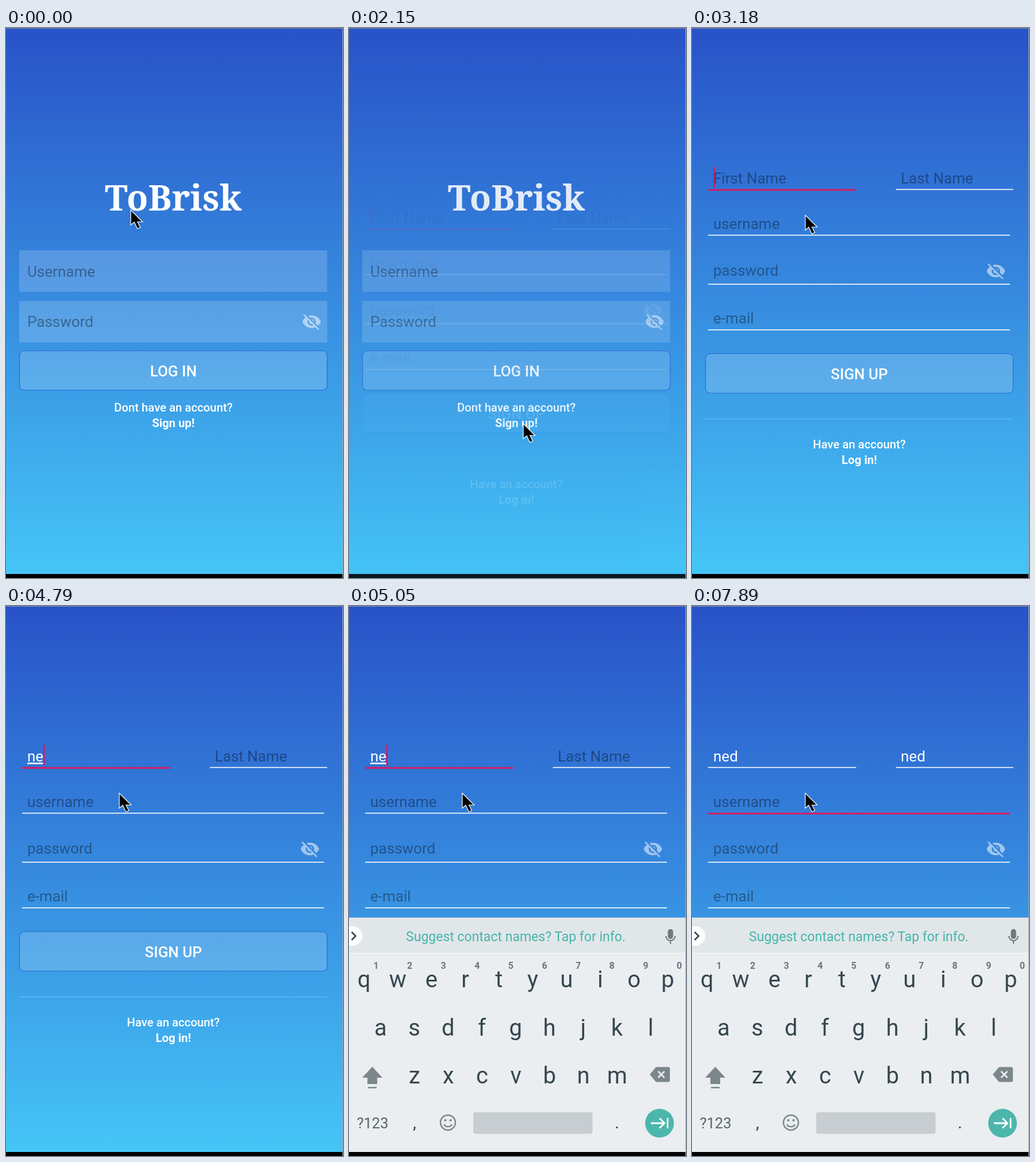
An HTML page for the animation above (8 s loop, 586 by 955 pixels).

```html
<!DOCTYPE html>
<html lang="en">
<head>
<meta charset="utf-8">
<title>Sign up flow</title>
<style>
  html, body { margin: 0; width: 100%; height: 100%; overflow: hidden; background: #000; }
  svg { display: block; width: 586px; height: 955px; font-family: Roboto, sans-serif; }
  .hint { fill: #000; fill-opacity: .37; }
  .mid { text-anchor: middle; }
</style>
</head>
<body>
<svg id="stage" viewBox="0 0 586 955"></svg>
<script>
const PINK = '#d81b60', KEY = '#37474f', ICON = '#7b878b';
const LOOP = 8000;

const rect = (x, y, w, h, attrs = '') =>
  `<rect x="${x}" y="${y}" width="${w}" height="${h}" ${attrs}/>`;
const text = (x, y, size, str, attrs = '') =>
  `<text x="${x}" y="${y}" font-size="${size}" ${attrs}>${str}</text>`;
const label = (y, size, weight, str) =>
  text(291, y, size, str, `class="mid" fill="#fff" font-weight="${weight}"`);
const hint = (x, y, str, id = '') => text(x, y, 26, str, `class="hint" id="${id}"`);
const box = y => rect(23, y, 535.5, 72, 'fill="#fff" fill-opacity=".17"');
const button = (y, str) =>
  rect(23.5, y + .5, 535, 68.5, 'rx="8" fill="#fff" fill-opacity=".17" stroke="none"') +
  rect(23.5, y + .5, 535, 68.5, 'rx="8" fill="none" stroke="#2a6bd2" stroke-width="1.2"') +
  label(y + 45, 26, 500, str);
const line = (x, y, w, id = '') => rect(x, y, w, 1.6, `fill="#fff" id="${id}"`);
const caret = (id, y) => rect(37, y, 2.7, 36, `id="${id}" fill="${PINK}"`);
const backdrop = () => rect(0, 0, 585, 948, 'fill="url(#sky)"');
const eye = (x, y) => `
  <g transform="translate(${x} ${y}) scale(1.455)" fill="#fff" fill-opacity=".53">
    <path clip-path="url(#slashGap)" fill-rule="evenodd" d="M1 12C2.7 7.6 7 4.5 12 4.5S21.3 7.6 23 12
      C21.3 16.4 17 19.5 12 19.5S2.7 16.4 1 12ZM7 12a5 5 0 0 0 10 0a5 5 0 0 0-10 0ZM9 12a3 3 0 0 0 6 0a3 3 0 0 0-6 0Z"/>
    <path d="M2 4.27 3.27 3 21 20.73 19.73 22Z"/>
  </g>`;

const keyRow = (letters, x, y) => [...letters].map((c, i) =>
  text(x + i * 58.7, y, 40, c, `class="mid" fill="${KEY}"`)).join('');
const digits = [...'1234567890'].map((c, i) =>
  text(47 + i * 58.6, 630, 16, c, 'class="mid" fill="#6b757a" font-weight="700"')).join('');

const login = `<g id="login">${backdrop()}
  ${text(291, 317, 61, 'ToBrisk', 'class="mid" fill="#fff" font-weight="900" font-family="Noto Serif, serif"')}
  ${box(386)}${box(474)}
  ${hint(37, 432, 'Username')}${hint(37, 519, 'Password')}
  ${eye(514, 492.5)}${caret('loginCaret', 404)}
  ${button(560, 'LOG IN')}
  ${label(666, 20.3, 500, 'Dont have an account?')}${label(693, 20.3, 700, 'Sign up!')}
</g>`;

const signup = `<g id="signup">${backdrop()}
  ${hint(37, 270, 'First Name', 'text0')}${hint(363, 270, 'Last Name', 'text1')}
  ${hint(37, 349, 'username')}${hint(37, 430, 'password')}${hint(37, 513, 'e-mail')}
  ${line(28, 279.6, 257.5, 'line0')}${line(354.5, 279.6, 204, 'line1')}${line(28, 358.9, 525, 'line2')}
  ${line(28, 444, 525)}${line(28, 523.4, 525)}
  ${eye(511, 404.5)}${caret('caret', 241)}
  ${button(565, 'SIGN UP')}
  ${rect(23, 678, 535.5, 1.4, 'fill="#fff" fill-opacity=".2"')}
  ${label(730, 20.3, 500, 'Have an account?')}${label(757, 20.3, 700, 'Log in!')}
</g>`;

const keyboard = `<g id="keyboard">
  ${rect(0, 541, 585, 407, 'fill="#eaeef1"')}${rect(0, 541, 585, 61, 'fill="#e1e6e8"')}
  ${rect(0, 602, 585, 2, 'fill="#f2f5f6"')}
  <circle cx="6" cy="573" r="17" fill="#fff"/>
  <path d="M4.5 566l7 7-7 7" fill="none" stroke="${KEY}" stroke-width="2.6"/>
  ${text(290, 582, 23, 'Suggest contact names? Tap for info.', 'class="mid" id="tip" fill="#46b5aa"')}
  <g fill="none" stroke="#70797d" stroke-width="2.2">
    ${rect(555.5, 562, 7, 15, 'rx="3.5" fill="#70797d"')}
    <path d="M551 573a8 8 0 0 0 16 0M559 581v5.5"/>
  </g>
  ${digits}
  ${keyRow('qwertyuiop', 26, 662)}${keyRow('asdfghjkl', 55, 746)}${keyRow('zxcvbnm', 114, 829)}
  <path fill="${ICON}" d="M40.5 800 58 819H49V830H32V819H23ZM33 835H48V837.5H33Z"/>
  <path fill="${ICON}" d="M523 813.5 533 801.5Q534 800.5 536 800.5H555Q558 800.5 558 803.5V823.5
    Q558 826.5 555 826.5H536Q534 826.5 533 825.5Z"/>
  <path d="M537.5 808l11 11m0-11l-11 11" stroke="#eaeef1" stroke-width="2.6"/>
  ${text(41, 907, 25.5, '?123', `class="mid" fill="#56646a"`)}
  ${text(114, 907, 30, ',', `class="mid" fill="${KEY}"`)}${text(466, 907, 30, '.', `class="mid" fill="${KEY}"`)}
  <circle cx="172" cy="897" r="13" fill="none" stroke="${ICON}" stroke-width="2.5"/>
  <path d="M165 900a7.5 6.5 0 0 0 14 0" fill="none" stroke="${ICON}" stroke-width="2.3"/>
  <circle cx="167.5" cy="893" r="2.1" fill="${ICON}"/><circle cx="176.5" cy="893" r="2.1" fill="${ICON}"/>
  ${rect(216, 879, 207.5, 37.5, 'rx="4" fill="#c8cdd1"')}
  <circle cx="540" cy="898" r="25" fill="#4db6ac"/>
  <path d="M525 898h23m-8-8.5l8.5 8.5-8.5 8.5M554 889v18" fill="none" stroke="#fff" stroke-width="2.8"/>
</g>`;

document.getElementById('stage').innerHTML = `
  <defs>
    <linearGradient id="sky" gradientUnits="userSpaceOnUse" x1="0" y1="0" x2="0" y2="948">
      <stop stop-color="#2852c8"/><stop offset="1" stop-color="#45c5f7"/>
    </linearGradient>
    <clipPath id="slashGap"><path d="M2.82 0H24V21.18ZM0 2.27V24H21.73Z"/></clipPath>
  </defs>
  ${rect(0, 0, 586, 955)}${login}${signup}${keyboard}
  ${rect(0, 0, 586, 1, 'fill="#8a90a0"')}${rect(585, 0, 1, 955, 'fill="#a0a4ac"')}
  <path id="pointer" d="M0 0V26L6 21 11.5 32.5 16.5 30.3 11.7 20.5H20.5Z" stroke="#fff" stroke-width="1.2"/>`;

const $ = id => document.getElementById(id);
const show = (id, on) => $(id).setAttribute('visibility', on ? 'visible' : 'hidden');
const place = (id, x, y) => $(id).setAttribute('transform', `translate(${x} ${y})`);

// The screen refreshes in short bursts: [from, to, steps]
const steps = [0];
for (const [from, to, n] of [[150, 1180, 8], [1330, 1870, 5], [2150, 2270, 2], [2390, 3180, 6]])
  for (let i = 0; i < n; i++) steps.push(from + Math.round(i * (to - from) / (n - 1)));

const pointerKeys = [[30, 217, 316], [1180, 278, 672], [1200, 278, 672], [1600, 357, 729],
  [1870, 303, 687], [2270, 303, 687], [3180, 197, 325]];
const caretToggles = [150, 592, 1180, 1600, 2150, 2697, 3180, 3700, 4110, 6130, 6510, 7890];
const fields = [
  { x: 37, hint: 'First Name', name: 'ned', keys: [4670, 4790, 5170], end: 5700 },
  { x: 363, hint: 'Last Name', name: 'ned', keys: [6510, 6780, 6930], end: 7340 },
];

function pointerAt(t) {
  const i = pointerKeys.findIndex(k => k[0] > t);
  if (i < 1) return pointerKeys.at(i).slice(1);
  const [a, b] = [pointerKeys[i - 1], pointerKeys[i]];
  const p = (t - a[0]) / (b[0] - a[0]), e = p * p * (3 - 2 * p);
  return [1, 2].map(j => a[j] + (b[j] - a[j]) * e);
}

function draw(t) {
  const shown = steps.findLast(s => s <= t);
  place('pointer', ...pointerAt(shown));

  const blink = caretToggles.filter(s => s <= t).length % 2 === 1;
  show('loginCaret', blink && t < 2150);

  // New page rises and fades in
  const since = shown - 2143;
  const left = d => 1 - Math.min(1, since / d);
  show('signup', since > 0);
  $('signup').setAttribute('opacity', 1 - left(200) ** 4);
  place('signup', 0, 76 * left(350) ** 5);

  const focus = t < 5700 ? 0 : t < 7340 ? 1 : 2;
  let caretX = 37;
  fields.forEach((f, i) => {
    const typed = f.name.slice(0, f.keys.filter(k => k <= t).length);
    const el = $('text' + i);
    el.textContent = typed || f.hint;
    el.setAttribute('class', typed ? '' : 'hint');
    el.setAttribute('fill', '#fff');
    el.setAttribute('text-decoration', typed && t < f.end ? 'underline' : 'none');
    if (focus === i) caretX = f.x + (typed ? el.getComputedTextLength() - .5 : 0);
  });
  for (let i = 0; i < 3; i++) {
    $('line' + i).setAttribute('fill', focus === i ? PINK : '#fff');
    $('line' + i).setAttribute('height', focus === i ? 3 : 1.6);
  }
  $('caret').setAttribute('x', caretX);
  $('caret').setAttribute('y', focus === 2 ? 320.5 : 241);
  show('caret', blink && since > 0);

  const rising = t < 5050;
  show('keyboard', t >= 4910);
  place('keyboard', 0, rising ? 65.5 : 0);
  $('keyboard').setAttribute('opacity', rising ? .62 : 1);
  $('tip').setAttribute('opacity', t >= 6780 && t < 7340 ? 0 : 1);
}

const start = performance.now();
function tick() {
  draw((performance.now() - start) % LOOP);
  requestAnimationFrame(tick);
}
tick();
</script>
</body>
</html>
```
